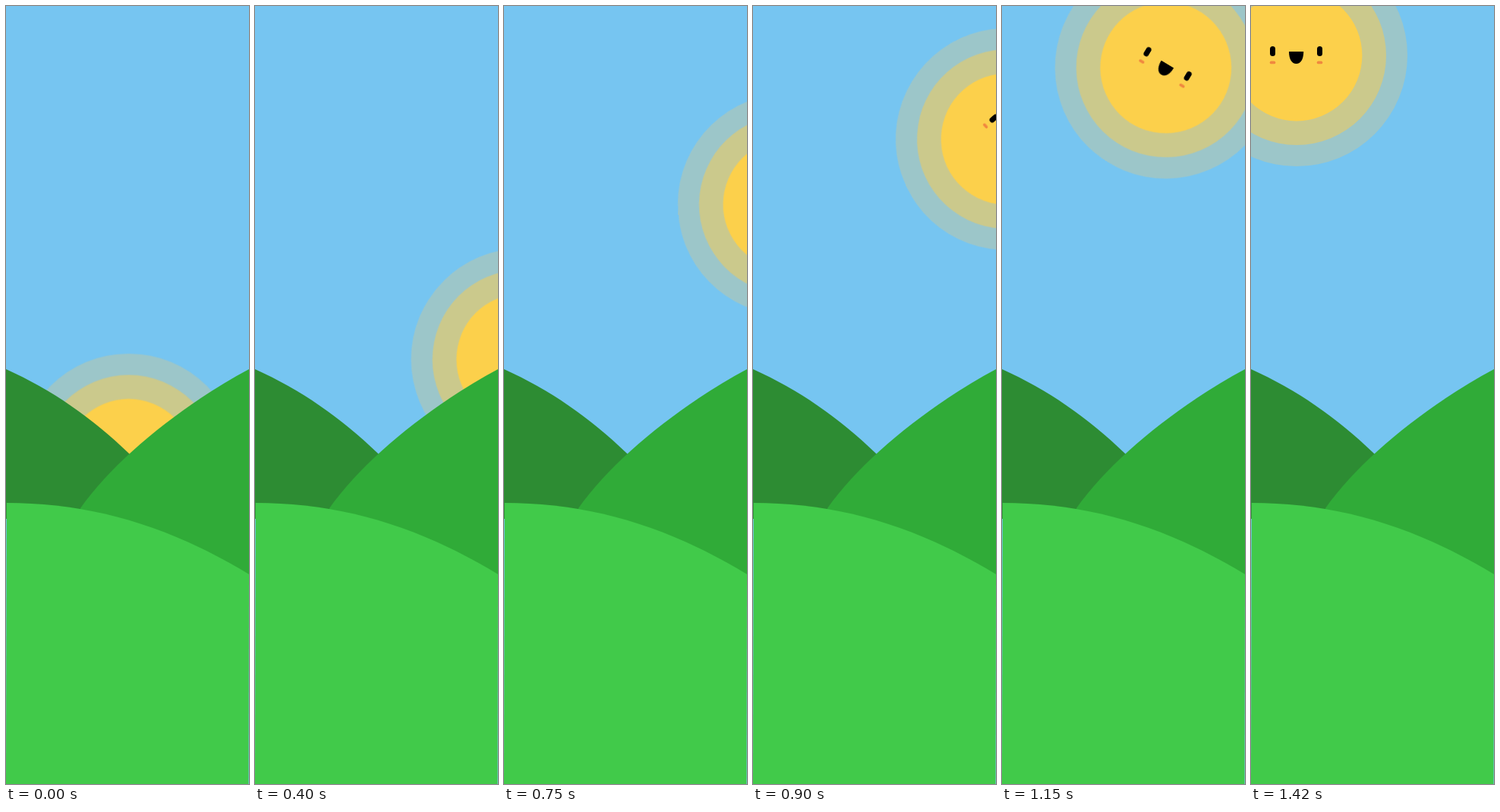
These frames come from a looping animation (320 px wide and 1024 px high, 2.28 s). An HTML page:

```html
<!DOCTYPE html>
<html lang="en">
<head>
<meta charset="utf-8">
<title>Sunrise</title>
<style>
  html, body {
    margin: 0;
    width: 100%;
    height: 100%;
    overflow: hidden;
    background: #76c5f1;
  }
  svg {
    display: block;
    width: 100%;
    height: 100%;
  }
  .orbit, .face {
    animation: 2280ms -1ms infinite;
  }
  .orbit {
    transform-origin: 110.8px 334.3px;
    animation-name: orbit;
  }
  .face {
    transform-origin: 60px 65px;
    animation-name: tilt;
  }

  /* The sun climbs 4 degrees per step, then rests at the top. */
  @keyframes orbit {
    0%       { transform: rotate(180deg);   animation-timing-function: steps(1); }
    1.3158%  { transform: rotate(177.2deg); animation-timing-function: steps(7); }
    10.5263% { transform: rotate(149.2deg); animation-timing-function: steps(9); }
    23.2456% { transform: rotate(113.2deg); animation-timing-function: steps(7); }
    32.8947% { transform: rotate(85.2deg);  animation-timing-function: steps(9); }
    44.7368% { transform: rotate(49.2deg);  animation-timing-function: steps(4); }
    50.4386% { transform: rotate(33.2deg);  animation-timing-function: steps(8); }
    60.9649% { transform: rotate(1.2deg);   animation-timing-function: steps(1); }
    62.2807%, 100% { transform: rotate(0deg); }
  }

  /* The face leans against the orbit and eases upright. */
  @keyframes tilt {
    0%       { transform: rotate(0deg);     animation-timing-function: steps(1); }
    32.8947% { transform: rotate(-36deg);   animation-timing-function: steps(5); }
    39.4737% { transform: rotate(-16.5deg); animation-timing-function: steps(4); }
    44.7368% { transform: rotate(-7.4deg);  animation-timing-function: steps(4); }
    50.4386% { transform: rotate(-2.2deg);  animation-timing-function: steps(4); }
    55.7018% { transform: rotate(-.3deg);   animation-timing-function: steps(5); }
    62.2807%, 100% { transform: rotate(0deg); }
  }
</style>
</head>
<body>
<svg viewBox="0 0 320 1024" preserveAspectRatio="none">
  <rect width="320" height="1024" fill="#76c5f1"/>

  <g class="orbit">
    <circle cx="60" cy="65" r="146" fill="#9cc6c9"/>
    <circle cx="60" cy="65" r="118" fill="#cbc98c"/>
    <circle cx="60" cy="65" r="86.4" fill="#fcd04b"/>
    <g class="face">
      <rect x="25" y="53" width="7" height="13" rx="3.5"/>
      <rect x="87" y="53" width="7" height="13" rx="3.5"/>
      <path d="M50 60H69.2C69.2 70 65.5 76 59.6 76S50 70 50 60Z"/>
      <g fill="#f0883f">
        <rect x="24.7" y="72.5" width="7.6" height="3.8" rx="1.9"/>
        <rect x="86.7" y="72.5" width="7.6" height="3.8" rx="1.9"/>
      </g>
    </g>
  </g>

  <path fill="#2d8c33" d="M0 478C60 505 112 541 162 589L180 607V680L0 675Z"/>
  <path fill="#30ab38" d="M98 661C145 594 236 523 320 478V748L200 740L98 700Z"/>
  <path fill="#41ca4a" d="M.9 654C110 654 213 683 320 748L319.4 1024H0Z"/>
</svg>
</body>
</html>
```
